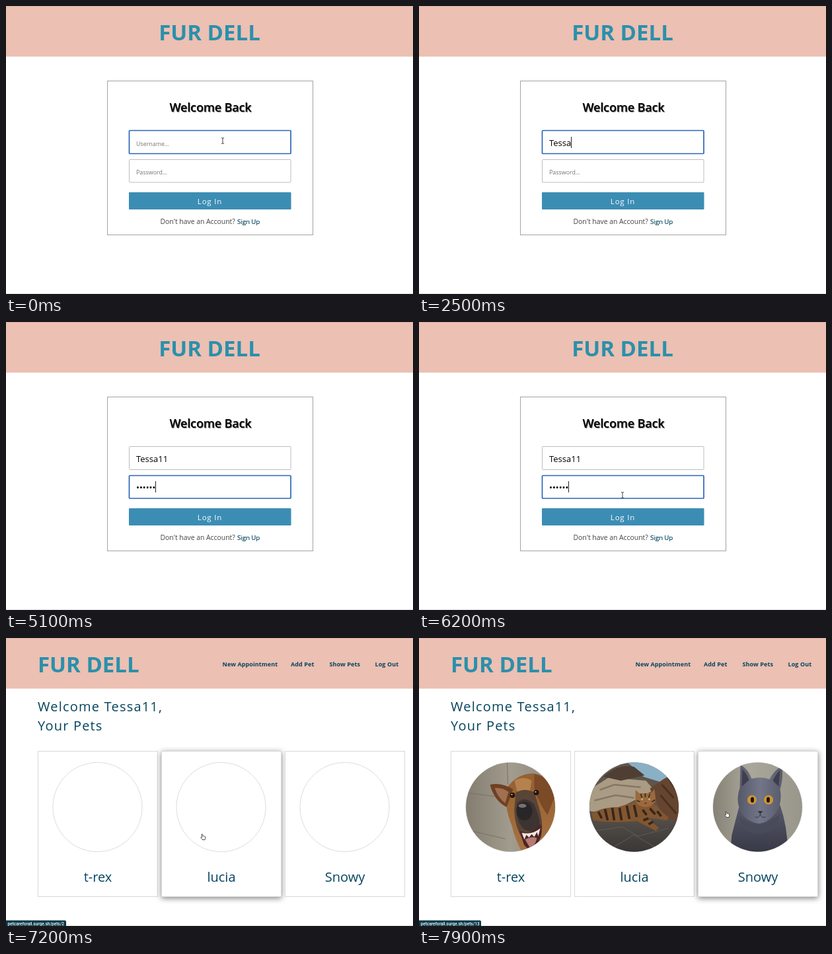
An HTML page for the animation above (8 s loop, 616 px wide and 436 px high).

```html
<!DOCTYPE html>
<html lang="en">
<head>
<meta charset="utf-8">
<title>Pet dashboard</title>
<style>
  html, body { margin: 0; width: 100%; height: 100%; overflow: hidden; background: #fff; }
  svg { display: block; width: 616px; height: 436px; font-family: "Open Sans", "Noto Sans", sans-serif; }
  text { white-space: pre; }
  .brand { font-size: 33px; font-weight: 700; fill: #2b90ac; }
  .title { font-size: 18px; font-weight: 600; letter-spacing: -.15px; filter: drop-shadow(1px 1.5px .6px #777); }
  .hint { font-size: 8.9px; fill: #757575; }
  .value { font-size: 13px; }
  .field { fill: #fff; stroke: #bdbdbd; }
  .field.on { stroke: #2c65b8; stroke-width: 1.7; }
  .nav { font-size: 9px; font-weight: 700; fill: #05445e; letter-spacing: .1px; }
  .hello { font-size: 20px; font-weight: 500; letter-spacing: 1.2px; fill: #05445e; }
  .pet { font-size: 20px; font-weight: 500; fill: #05445e; text-anchor: middle; }
  .card { fill: #fff; stroke: #d9d9d9; }
  .ring { fill: none; stroke: #b5b5b5; stroke-width: .8; stroke-dasharray: 1.2 .7; }
  .status { font: 500 6.5px Roboto, sans-serif; fill: #fff; }
  .mid { text-anchor: middle; }
</style>
</head>
<body>
<svg viewBox="0 0 616 436">
  <defs>
    <clipPath id="round"><circle r="67.5"/></clipPath>
    <linearGradient id="wall"><stop stop-color="#837d70"/><stop offset=".5" stop-color="#a29c8f"/><stop offset="1" stop-color="#8d877b"/></linearGradient>
    <linearGradient id="room"><stop stop-color="#858174"/><stop offset=".4" stop-color="#aaa79b"/><stop offset="1" stop-color="#98958a"/></linearGradient>
    <linearGradient id="fur" x2="0" y2="1"><stop stop-color="#94602f"/><stop offset="1" stop-color="#a87241"/></linearGradient>
    <linearGradient id="coat" x2="0" y2="1"><stop stop-color="#5b5e6f"/><stop offset="1" stop-color="#373845"/></linearGradient>
    <linearGradient id="face"><stop stop-color="#555869"/><stop offset=".5" stop-color="#737688"/><stop offset="1" stop-color="#585b6c"/></linearGradient>
    <linearGradient id="ground" x2="0" y2="1"><stop stop-color="#5a534c"/><stop offset="1" stop-color="#393736"/></linearGradient>

    <g id="dog">
      <rect x="-68" y="-68" width="136" height="136" fill="url(#wall)"/>
      <path d="M-68-22L-24-16M-5-68L-4-34M-68 34L-8 48" stroke="#777164" fill="none"/>
      <path d="M-6-28Q8-50 34-51Q60-48 70-22V70H18Q6 46 2 28Q-10 0-6-28Z" fill="url(#fur)"/>
      <path d="M-31-34Q-14-38 4-27L-6 0Q-25-10-31-34Z" fill="#6e4122"/>
      <path d="M-24-29Q-12-30-3-23L-8-6Q-19-14-24-29Z" fill="#a07050"/>
      <path d="M36-50Q60-46 67-16L56 12Q42-8 36-28Z" fill="#7b4a27"/>
      <path d="M6-40Q20-48 32-40L28-16H12Z" fill="#b5824e"/>
      <path d="M8-22Q22-30 36-22Q42-4 45 8Q50 28 46 46Q30 68 20 52Q4 26 6 0Z" fill="#594436"/>
      <path d="M10-6Q21-18 35-5Q46 17 44 32Q28 42 17 30Q6 14 10-6Z" fill="#3d3331"/>
      <ellipse cx="21" cy="6" rx="12" ry="14" fill="#292628"/>
      <ellipse cx="18" cy="-2" rx="6" ry="3" fill="#77716f"/>
      <circle cx="3" cy="-18" r="4" fill="#24150d"/><circle cx="39" cy="-22" r="4" fill="#24150d"/>
      <circle cx="2" cy="-19" r="1" fill="#ddd"/><circle cx="38" cy="-23" r="1" fill="#ddd"/>
      <path d="M14 36Q30 44 46 26Q50 44 38 59Q27 68 20 56Z" fill="#4d2425"/>
      <path d="M22 49Q33 43 40 47Q37 60 29 61Z" fill="#b87a77"/>
      <path d="M17 39l4 10 3-7 4 4 4-5 4 4 4-7 2 6 3-12Q34 42 17 39Z" fill="#eee8de"/>
    </g>

    <g id="tabby">
      <rect x="-68" y="-68" width="136" height="136" fill="#5f554b"/>
      <path d="M-10-68H68V-48L40-38L14-46Z" fill="#8ab0c6"/>
      <path d="M-68-26L-38-45L18-40L30-26L4-12L-20 0L-68 8Z" fill="#aa9b84"/>
      <path d="M-52-26L-30-34L10-30M-60-10L-28-18L0-14" stroke="#857764" stroke-width="2.5" fill="none"/>
      <path d="M-46-46Q-25-66 0-61L16-48L-20-40Z" fill="#4f3e33"/>
      <path d="M24-28L44-42L68-56V36L44 14Z" fill="#65452f"/>
      <path d="M42-34L60-14M52-44L66-22M40-18L64 10" stroke="#493122" stroke-width="3"/>
      <path d="M-68 6L-16 14L68 20V68H-68Z" fill="url(#ground)"/>
      <path d="M-60 36L-18 30L6 44L52 32M-30 60L0 42L34 62" stroke="#5f5b57" fill="none"/>
      <path d="M-64 10Q-50 0-24 0L4-9Q18-12 34-2Q44 10 52 15L50 20L22 16Q32 28 38 31L33 36L4 21Q-30 25-62 20Z" fill="#825630"/>
      <path d="M2-26L8-21H25L31-27L33-10Q27 0 17 0Q4-1 2-11Z" fill="#9a6a3e"/>
      <path d="M-54 7l5 10M-44 3l4 17M-33 1l3 19M-22 1l3 19M-11-2l4 20M0-3l4 18M13 4l6 8M24 2l8 9M35 6l6 8M14 20l8-3M22 26l7-4" stroke="#35261c" stroke-width="3.6"/>
      <path d="M10-20l2 6M17-21v6M24-20l-2 6M4-10l5 2M32-11l-5 3" stroke="#38271c" stroke-width="1.6"/>
      <circle cx="12" cy="-12" r="1.6" fill="#c5b16c"/><circle cx="23" cy="-12" r="1.6" fill="#c5b16c"/>
      <path d="M15-7h5l-2.5 3Z" fill="#703c32"/>
    </g>

    <g id="grey">
      <rect x="-68" y="-68" width="136" height="136" fill="url(#room)"/>
      <path d="M-25-12Q-32 14-39 42L-42 70H46Q45 24 32-8Z" fill="url(#coat)"/>
      <path d="M-26-64Q-14-57-9-43Q6-47 18-42Q25-56 37-62Q39-44 34-27Q38-8 28 8Q16 24 2 25Q-16 23-25 8Q-34-10-27-29Z" fill="url(#face)"/>
      <path d="M-23-57Q-16-50-13-41L-24-31ZM34-56Q27-49 23-40L32-31Z" fill="#403e4c"/>
      <path d="M-28 14Q2 40 34 10L28 31Q2 48-23 32Z" fill="#484b5a"/>
      <circle cx="-8.5" cy="-11" r="7" fill="#d2952d"/><circle cx="16.5" cy="-11" r="7" fill="#d2952d"/>
      <ellipse cx="-8" cy="-11" rx="2.6" ry="4.2" fill="#171519"/><ellipse cx="16" cy="-11" rx="2.6" ry="4.2" fill="#171519"/>
      <path d="M0 6h8l-4 5Z" fill="#343542"/>
      <path d="M4 11Q2 17-4 15M4 11Q6 17 12 15" stroke="#343542" fill="none"/>
    </g>
  </defs>

  <rect width="616" height="436" fill="#fff"/>
  <rect width="616" height="76.6" fill="#ecc0b2"/>
  <rect width="616" height="1" fill="#dcb5a9"/>
  <rect y="435" width="616" height="1" fill="#dedede"/>

  <g id="login">
    <text class="brand mid" x="308" y="52">FUR DELL</text>
    <rect x="153.5" y="113.5" width="311" height="233" fill="#fff" stroke="#a3a3a3"/>
    <text class="title mid" x="309.5" y="160">Welcome Back</text>
    <rect id="userBox" class="field" x="186.5" y="188.5" width="244.5" height="35" rx="1"/>
    <rect id="passBox" class="field" x="186.5" y="232.5" width="244.5" height="34.5" rx="1"/>
    <text id="userHint" class="hint" x="197" y="212">Username...</text>
    <text id="passHint" class="hint" x="197" y="255">Password...</text>
    <text id="user" class="value" x="197" y="211.5"></text>
    <text id="pass" class="value" x="197" y="255"></text>
    <rect id="caret" width="1" height="17" fill="#222"/>
    <rect x="186" y="282" width="245.5" height="26" rx="1" fill="#3c8db4"/>
    <rect id="buttonRing" x="186.5" y="282.5" width="244.5" height="25" rx="1" fill="none" stroke="#2360b0" stroke-width="1.4"/>
    <text class="mid" x="308.5" y="300" font-size="11.5" letter-spacing=".8" fill="#fff">Log In</text>
    <text x="233.5" y="330" font-size="10.4" fill="#444">Don't have an Account?</text>
    <text x="350" y="330" font-size="9.8" letter-spacing="-.1" fill="#05445e" stroke="#05445e" stroke-width=".2">Sign Up</text>
  </g>

  <g id="home">
    <text class="brand" x="48" y="52">FUR DELL</text>
    <g class="nav">
      <text x="327.5" y="43">New Appointment</text><text x="431" y="43">Add Pet</text>
      <text x="489.5" y="43">Show Pets</text><text x="558.5" y="43">Log Out</text>
    </g>
    <text class="hello" x="48" y="110.5">Welcome Tessa11,</text>
    <text class="hello" x="48" y="139.5">Your Pets</text>
    <g id="cards"></g>
    <g id="status">
      <path id="statusBox" fill="#07394a"/>
      <text id="url" class="status" x="2.5" y="434.6"></text>
    </g>
  </g>

  <g id="beam" fill="none" stroke="#333" stroke-width=".9"><path d="M-2-4.5Q0-4.5 0-3Q0-4.5 2-4.5M0-3V3M-2 4.5Q0 4.5 0 3Q0 4.5 2 4.5"/></g>
  <g id="arrow"><path d="M0 0V8L1.9 6.3L3.2 9.2L4.6 8.5L3.3 5.8H5.7Z" fill="#111" stroke="#fff" stroke-width=".6"/></g>
  <g id="hand"><path d="M-2-3.8Q-1-4.8-.4-3.6L.3-1.2Q1-1.9 1.6-.9Q2.3-1.5 2.8-.5Q3.9-.6 3.8.8Q3.8 2.6 3 4.5H-.6Q-1.2 3-3.4 1.2Q-3.2.1-1.2.9Z" fill="#fff" stroke="#222" stroke-width=".8"/></g>
</svg>
<script>
const LOOP = 8000, TICK = 100;
const $ = id => document.getElementById(id);
const show = (id, on) => { $(id).style.display = on ? "" : "none"; };
const within = (t, spans) => spans.some(([a, b]) => t >= a && t < b);
const count = (t, times) => times.filter(s => s <= t).length;

const NAME = "Tessa11";
const NAME_KEYS = [700, 1900, 2100, 2300, 2500, 3000, 3200];
const PASS_KEYS = [3800, 4000, 4200, 4600, 4900, 5100];
const CARET = [[400, 1200], [1700, 5600], [6100, 6400]];
const PASS_FOCUS = 3500, BUTTON_FOCUS = 6400, HOME = 7100, CARDS = 7200, PHOTOS = 7400;

// time, shape, x, y
const POINTER = [
  [0, "beam", 328, 204], [700, "", 0, 0],
  [5900, "beam", 328, 207], [6000, "beam", 323, 224], [6100, "beam", 315, 247],
  [6200, "beam", 308, 262], [6300, "arrow", 301, 284], [6400, "arrow", 297, 291],
  [6600, "arrow", 300, 304], [6700, "arrow", 297, 297], [7200, "hand", 298, 301]
];

const PETS = [["t-rex", "dog", 48], ["lucia", "tabby", 235], ["Snowy", "grey", 422]];
$("cards").innerHTML = PETS.map(([name, art, x]) => `
  <rect class="card" x="${x + .5}" y="171.5" width="181" height="220"/>
  <g transform="translate(${x + 90.5} 256)">
    <circle class="ring" r="67.5"/>
    <g class="photo" clip-path="url(#round)"><use href="#${art}"/></g>
  </g>
  <text class="pet" x="${x + 91}" y="369">${name}</text>`).join("");
const cards = [...document.querySelectorAll(".card")];
const photos = document.querySelectorAll(".photo");

function pointerAt(t) {
  let [, shape, x, y] = POINTER.filter(p => p[0] <= t).pop();
  if (t > PHOTOS) {
    const p = Math.min(1, (t - PHOTOS) / 500);
    const e = p * p * (3 - 2 * p);
    x += 168 * e;
    y -= 34 * e;
  }
  return { shape, x, y };
}

function drawLogin(t) {
  const chars = count(t, NAME_KEYS), dots = count(t, PASS_KEYS);
  const inPass = t >= PASS_FOCUS && t < BUTTON_FOCUS;
  $("user").textContent = NAME.slice(0, chars);
  $("pass").textContent = "•".repeat(dots);
  show("userHint", !chars);
  show("passHint", !dots);
  $("userBox").classList.toggle("on", t < PASS_FOCUS);
  $("passBox").classList.toggle("on", inPass);
  show("buttonRing", t >= BUTTON_FOCUS);
  show("caret", within(t, CARET));
  const typed = $(inPass ? "pass" : "user");
  const width = typed.textContent ? typed.getComputedTextLength() : 0;
  $("caret").setAttribute("x", 197 + Math.round(width));
  $("caret").setAttribute("y", inPass ? 241 : 198);
}

function drawHome(t, x) {
  show("cards", t >= CARDS);
  show("status", t >= CARDS);
  photos.forEach(p => { p.style.display = t >= PHOTOS ? "" : "none"; });
  const over = x < 420 ? 1 : 2;
  cards.forEach((card, i) => {
    card.style.filter = i === over ? "drop-shadow(0 2.5px 4px rgba(0,0,0,.5))" : "";
  });
  const right = over === 1 ? 91 : 94;
  $("statusBox").setAttribute("d", `M0 427.5H${right - 2}Q${right} 427.5 ${right} 429.5V436H0Z`);
  $("url").textContent = "petcareforall.surge.sh/pets/" + (over === 1 ? 2 : 13);
}

function draw(now) {
  const t = Math.floor(now % LOOP / TICK) * TICK;
  const { shape, x, y } = pointerAt(t);
  const home = t >= HOME;
  show("login", !home);
  show("home", home);
  if (home) drawHome(t, x); else drawLogin(t);
  for (const id of ["beam", "arrow", "hand"]) show(id, id === shape);
  if (shape) $(shape).setAttribute("transform", `translate(${x} ${y})`);
}

let start;
function loop(now) {
  start ??= now;
  draw(Math.max(0, now - start));
  requestAnimationFrame(loop);
}
draw(0);
requestAnimationFrame(loop);
</script>
</body>
</html>
```
